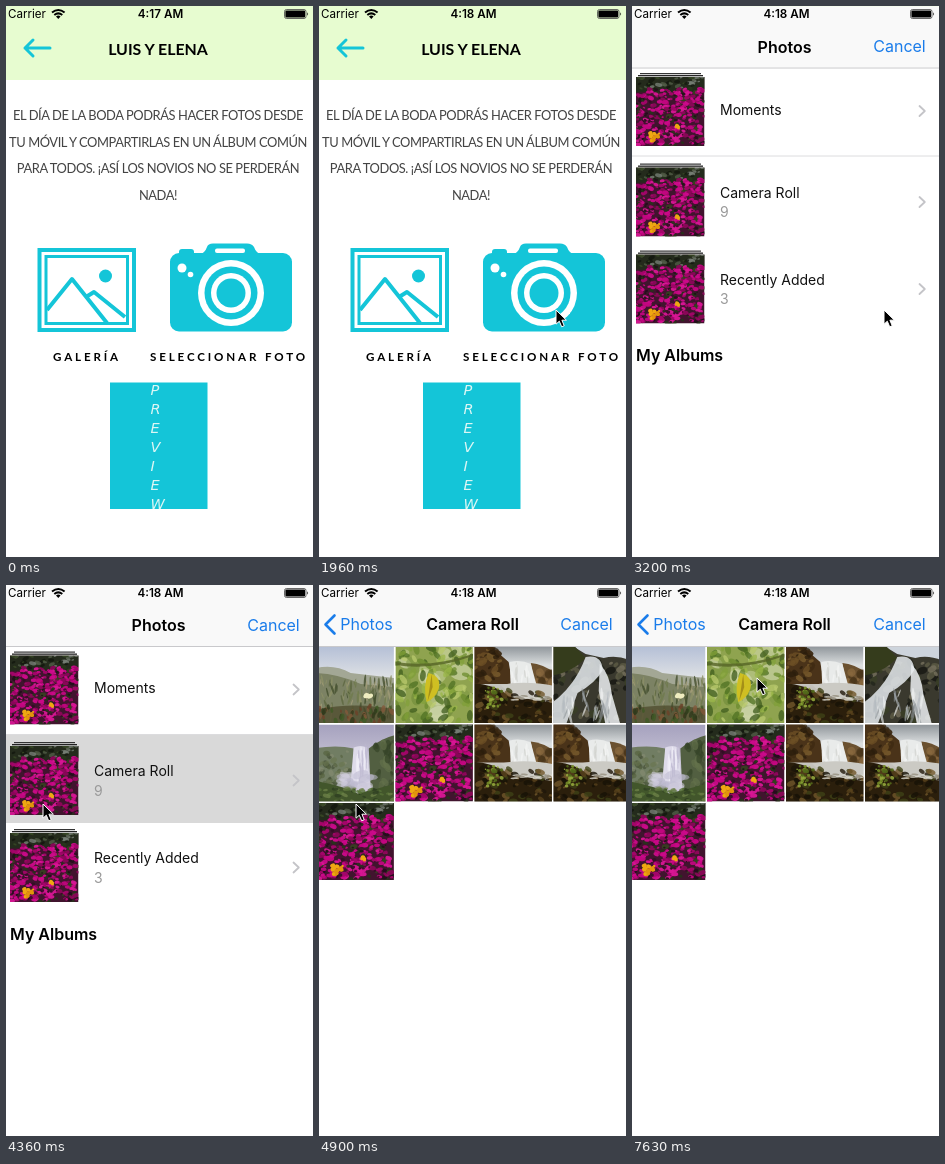
An HTML page that plays this animation: 307 px wide and 551 px high, repeating every 8000 ms.

```html
<!DOCTYPE html>
<html lang="es">
<head>
<meta charset="utf-8">
<title>Álbum de boda</title>
<style>
html, body { margin: 0; width: 100%; height: 100%; overflow: hidden; background: #fff; }
svg { display: block; width: 307px; height: 551px; font-family: Inter, "Noto Sans", sans-serif; }
.hand { font-family: Lato, "Open Sans", sans-serif; }
.body { font-size: 12.9px; letter-spacing: -.42px; fill: #444; text-anchor: middle; }
.label { font-size: 11.6px; font-weight: 700; letter-spacing: 2.85px; }
.row { font-size: 14px; fill: #111; }
.count { font-size: 14px; fill: #999; }
.bold { font-size: 16px; font-weight: 600; }
.nav { font-size: 16px; fill: #1a7cea; text-anchor: middle; }
.mid { text-anchor: middle; }
.line { fill: none; stroke-linecap: round; stroke-linejoin: round; }
</style>
</head>
<body>
<svg id="stage" viewBox="0 0 307 551" xmlns="http://www.w3.org/2000/svg">
  <defs>
    <linearGradient id="shade"><stop offset="0" stop-color="#000" stop-opacity="0"/><stop offset="1" stop-color="#000" stop-opacity=".11"/></linearGradient>
    <linearGradient id="sky" x2="0" y2="1"><stop offset="0" stop-color="#b4bfd6"/><stop offset=".4" stop-color="#dde0e4"/></linearGradient>
    <linearGradient id="dusk" x2="0" y2="1"><stop offset="0" stop-color="#a5a1be"/><stop offset=".5" stop-color="#c9c5d6"/></linearGradient>
    <linearGradient id="mist" x2="0" y2="1"><stop offset="0" stop-color="#8e9499"/><stop offset=".25" stop-color="#dcdfe0"/><stop offset=".6" stop-color="#bdbab2"/></linearGradient>
    <filter id="soft"><feGaussianBlur stdDeviation=".7"/></filter>
    <g id="photos"></g>
  </defs>

  <rect width="307" height="551" fill="#fff"/>
  <g id="page" class="hand">
    <rect width="307" height="74" fill="#e7fcd0"/>
    <path class="line" d="M44 42H19M27 34L19 42L27 50" stroke="#14c5d8" stroke-width="3"/>
    <text class="mid" x="152" y="48.5" font-size="15.9" font-weight="700">LUIS Y ELENA</text>
    <text class="body" x="152" y="113.5">EL DÍA DE LA BODA PODRÁS HACER FOTOS DESDE</text>
    <text class="body" x="152" y="140.5">TU MÓVIL Y COMPARTIRLAS EN UN ÁLBUM COMÚN</text>
    <text class="body" x="152" y="167">PARA TODOS. ¡ASÍ LOS NOVIOS NO SE PERDERÁN</text>
    <text class="body" x="152" y="193.5">NADA!</text>

    <g fill="none" stroke="#14c5d8">
      <rect x="33.5" y="244" width="94.5" height="80" stroke-width="4"/>
      <rect x="40" y="250.5" width="81.5" height="67" stroke-width="3"/>
      <path d="M41 304L66 273L101 317M80 291L88 286L119 311" stroke-width="4" stroke-linejoin="round"/>
    </g>
    <circle cx="99.5" cy="270" r="6.5" fill="#14c5d8"/>

    <g fill="#14c5d8">
      <rect x="164" y="247" width="122" height="78.5" rx="9"/>
      <path d="M193 249Q199 247 201 241Q202 237.5 207 237.5H241Q246 237.5 248 241Q250 247 256 249Z"/>
      <rect x="173" y="243" width="15" height="8" rx="3"/>
      <rect x="209" y="242.5" width="30" height="4.5" rx="2" fill="#fff"/>
      <circle cx="225" cy="287" r="33" fill="#fff"/>
      <circle cx="225" cy="287" r="26.5"/>
      <circle cx="225" cy="287" r="20" fill="#fff"/>
      <circle cx="225" cy="287" r="14.5"/>
      <circle cx="176" cy="262" r="4.5" fill="#fff"/>
      <circle cx="184.5" cy="268.5" r="2.8" fill="#fff"/>
    </g>
    <text class="label" x="47" y="354.5">GALERÍA</text>
    <text class="label" x="144" y="354.5">SELECCIONAR FOTO</text>
    <rect x="104" y="376.5" width="97.5" height="126.5" fill="#14c5d8"/>
    <g id="preview" fill="#dcf6f4" font-family="DejaVu Sans, sans-serif" font-size="14.5" font-style="italic"></g>
  </g>

  <g id="sheet">
    <rect width="307" height="1100" fill="#fff"/>
    <g id="list">
      <rect id="press" y="149.5" width="307" height="88.5" fill="#d9d9d9"/>
      <g id="rows"></g>
      <rect y="149" width="307" height="1" fill="#dcdcde"/>
      <g id="albums">
        <rect y="343" width="307" height="800" fill="#fff"/>
        <text class="bold" x="4" y="354.5">My Albums</text>
      </g>
    </g>
    <rect id="dim" width="307" height="551" fill="#1a1600"/>
    <g id="grid">
      <rect x="-13" width="9" height="551" fill="url(#shade)"/>
      <rect x="-4" width="330" height="551" fill="#fff"/>
      <g id="cells"></g>
    </g>
    <rect width="307" height="61" fill="#f9f9f9"/>
    <rect y="61" width="307" height="1" fill="#c9c9cc"/>
    <path id="back" class="line" d="M15.5 30.5L6.5 39.5L15.5 48.5" stroke="#1a7cea" stroke-width="2.6"/>
    <text id="backText" class="nav" x="47.5" y="45">Photos</text>
    <text id="oldTitle" class="bold mid" y="46">Photos</text>
    <text id="newTitle" class="bold mid" y="45">Camera Roll</text>
    <text id="cancel" class="nav" x="267.5" y="45.5">Cancel</text>
  </g>

  <g id="status">
    <text x="2" y="12.3" font-size="11.6">Carrier</text>
    <path d="M46 6.5Q52.3 1.5 58.6 6.5M48.3 9Q52.3 5.8 56.3 9" fill="none" stroke="#000" stroke-width="2"/>
    <path d="M50 10.5Q52.3 8.7 54.6 10.5L52.3 13Z"/>
    <text id="clock" class="mid" x="154.5" y="12.3" font-size="11.7" font-weight="600"></text>
    <rect x="278.5" y="3.5" width="21.5" height="9" rx="2" fill="none" stroke="#444" stroke-width=".8"/>
    <rect x="279.4" y="4.4" width="19.7" height="7.2" rx="1"/>
    <path d="M301.3 6.3Q303 8 301.3 9.7Z"/>
  </g>

  <path id="cursor" d="M0 0V14.2L3.3 11.2L5.7 16.8L8.2 15.7L5.9 10.2H10.4Z" stroke="#fff" stroke-width="1"/>
</svg>

<script>
const $ = id => document.getElementById(id);
const LOOP = 8000;

let seed = 7;
const rand = (a, b) => {
  seed = (seed * 16807) % 2147483647;
  return a + (b - a) * seed / 2147483647;
};

const path = (fill, d, o = 1) => `<path d="${d}" fill="${fill}" opacity="${o}"/>`;

// Scatter n dabs over the box x0,y0 to x1,y1, tilted by up to `turn` degrees
function dabs(n, fills, [x0, y0, x1, y1], rx, ry, o = 1, turn = 30) {
  let out = '';
  for (let i = 0; i < n; i++) {
    const x = rand(x0, x1).toFixed(1), y = rand(y0, y1).toFixed(1), k = rand(.5, 1.4);
    out += `<ellipse rx="${(rx * k).toFixed(1)}" ry="${(ry * k).toFixed(1)}" fill="${fills[i % fills.length]}" opacity="${o}"`
      + ` transform="translate(${x} ${y}) rotate(${rand(-turn, turn).toFixed(0)})"/>`;
  }
  return out;
}

// name: [base fill, art]
const photos = {
  dunes: ['url(#sky)',
    path('#a3a795', 'M0 22Q18 18 34 27L77 32V50H0Z')
    + path('#7c8264', 'M0 27Q22 28 44 38L77 41V80H0Z')
    + dabs(110, ['#5c6640', '#8c9066', '#434f2e', '#a39c78', '#6f7a4c'], [0, 34, 77, 72], .9, 5, .8, 25)
    + path('#4a4629', 'M-3 64Q40 55 80 64V80H-3Z', .7)
    + dabs(50, ['#6d4128', '#3f5a26', '#82573a', '#2f3a1c'], [0, 60, 77, 78], 1.6, 3, .8)
    + dabs(4, ['#f0edc0'], [49, 48, 54, 51], 2.6, 1.8)],
  leaf: ['#8fa34f',
    dabs(30, ['#c3cf94', '#d5dcb4', '#7f9a43', '#6e8a37'], [0, 0, 77, 77], 8, 6, .6, 90)
    + dabs(110, ['#6b8b2e', '#4d7022', '#9ab548', '#b9c96e', '#82a03a', '#3f5c1d'], [0, 0, 77, 77], 2.4, 4.6, .75, 80)
    + path('#566526', 'M0 16Q36 22 77 8V10Q36 25 0 19Z', .8)
    + path('#cfbf22', 'M33 27Q46 30 43 43Q39 53 31 56Q27 40 33 27Z')
    + path('#a48f18', 'M36 28L32 55L37 41Z')],
  shore: ['url(#mist)',
    path('#4a3319', 'M-3 -3H14Q24 8 34 16L38 38H-3Z')
    + dabs(34, ['#6e5026', '#2b1d0c', '#7d602f', '#3d2a12'], [0, 2, 27, 35], 4, 2.4, .75, 60)
    + path('#6b5130', 'M56 17Q68 18 80 27V44H61Z')
    + dabs(12, ['#8a6a3e', '#493519'], [62, 25, 77, 39], 3, 3, .7, 60)
    + path('#e9ebea', 'M35 16Q46 13 56 18L62 40H36Z')
    + dabs(14, ['#f4f5f4', '#cfd0cc'], [37, 19, 58, 40], 1.2, 6, .7, 8)
    + path('#cbcac4', 'M26 39Q50 34 80 40V57L40 52Z')
    + path('#2b1f0c', 'M-3 37Q20 38 34 50L80 57V80H-3Z')
    + dabs(70, ['#59421d', '#171106', '#71562a', '#3e4117', '#1f170a'], [0, 42, 77, 78], 3.4, 2, .8, 50)
    + dabs(16, ['#dad8d0', '#96907f'], [36, 49, 77, 54], 4, .9, .8, 10)
    + dabs(36, ['#768c28', '#52691b', '#93a63c'], [11, 41, 28, 64], 1.5, 1.3, .9)],
  cascade: ['#3a392e',
    path('#cdd4dc', 'M14 -3H80V16Q64 8 50 12L32 8Z')
    + dabs(80, ['#22241b', '#5d5b45', '#383f25', '#151611', '#75715c'], [0, 14, 77, 77], 4, 2.6, .8, 80)
    + path('#353c1c', 'M-3 -3H18L32 12Q18 27 -3 30Z')
    + path('#dfe3e6', 'M32 11Q48 8 49 24Q42 37 24 47L12 80H-3V58Q21 41 32 11Z', .88)
    + path('#eceff1', 'M46 18Q56 28 58 48L67 80H52L45 45Z', .85)
    + dabs(30, ['#f5f6f7', '#b2b9be', '#8e9498'], [8, 44, 58, 75], 1, 7, .6, 22)],
  falls: ['url(#dusk)',
    path('#717d63', 'M-3 24Q20 20 37 24L38 68H-3Z')
    + path('#525f41', 'M80 10Q64 14 52 24L54 66H80Z')
    + dabs(50, ['#56633f', '#868c72', '#434f36', '#6a7650'], [0, 27, 33, 62], 3, 2.2, .65, 70)
    + dabs(36, ['#3f4d31', '#64714c', '#344227'], [58, 20, 77, 64], 2.4, 4, .65, 40)
    + path('#dedbea', 'M37 23Q44 20 50 23L53 58H34Z')
    + dabs(16, ['#f1eff8', '#bcb7d0'], [38, 25, 50, 58], .9, 7, .7, 5)
    + dabs(22, ['#d3cfe0', '#c0bbd2'], [24, 50, 56, 62], 6, 3, .55)
    + path('#42562b', 'M-3 56Q25 61 41 69L80 59V80H-3Z')
    + dabs(44, ['#587238', '#2e3f22', '#6b8047'], [0, 64, 77, 78], 3, 1.5, .8)],
  flowers: ['#41142e',
    path('#242b1c', 'M-3 -3H80V17H-3Z')
    + dabs(40, ['#515c47', '#12170e', '#777f76', '#384a25'], [0, 0, 77, 13], 3, 1.6, .8)
    + dabs(60, ['#26351a', '#200d19', '#35451f'], [0, 14, 77, 77], 3, 2, .85)
    + dabs(270, ['#c2067f', '#d81695', '#a30569', '#cb0a8a', '#8b0658'], [0, 13, 77, 76], 2.7, 1.7, .95)
    + dabs(60, ['#26331a', '#340c25', '#1c1414'], [0, 18, 77, 78], 1.6, 1.2, .9)
    + dabs(12, ['#efa812', '#e2940c'], [15, 62, 27, 72], 2.6, 2.2)
    + dabs(4, ['#efa812'], [44, 54, 48, 57], 1.9, 1.7)]
};

$('photos').innerHTML = Object.entries(photos).map(([name, [base, art]]) =>
  `<symbol id="${name}" viewBox="0 0 77 77" preserveAspectRatio="none">`
  + `<rect width="77" height="77" fill="${base}"/><g filter="url(#soft)">${art}</g></symbol>`).join('');
const photo = (name, x, y, w, h) => `<use href="#${name}" x="${x}" y="${y}" width="${w}" height="${h}"/>`;

$('preview').innerHTML = [...'PREVIEW'].map((c, i) =>
  `<text x="144.5" y="${388.5 + i * 19}">${c}</text>`).join('');

// name, thumbnail top, text baseline, chevron y, count
$('rows').innerHTML = [
  ['Moments', 66.5, 108, 104.5],
  ['Camera Roll', 157, 191, 195.5, 9],
  ['Recently Added', 244, 278, 282.5, 3]
].map(([name, top, base, mid, n]) =>
  `<rect x="8" y="${top}" width="61" height="1.2" fill="#333"/>`
  + `<rect x="6" y="${top + 2}" width="65" height="1.3" fill="#222"/>`
  + photo('flowers', 4, top + 4, 68.5, 69)
  + `<text class="row" x="88" y="${base}">${name}</text>`
  + (n ? `<text class="count" x="88" y="${base + 19.5}">${n}</text>` : '')
  + `<path class="line" d="M287.5 ${mid - 5}l5.3 5l-5.3 5" stroke="#c4c4c8" stroke-width="1.8"/>`).join('');

$('cells').innerHTML = [
  ['dunes', 'leaf', 'shore', 'cascade'],
  ['falls', 'flowers', 'shore', 'shore'],
  ['flowers']
].map((row, r) => row.map((name, c) =>
  photo(name, -4 + 79 * c, 61 + 78.5 * r, 77.5, 77)).join('')).join('');

// start, end, steps, waypoints
const moves = [
  [170, 880, 10, [[222, 520], [226, 400], [236, 297]]],
  [1040, 1100, 2, [[236, 297], [228, 298]]],
  [1960, 2030, 2, [[228, 298], [237, 304], [252, 304]]],
  [3270, 3350, 2, [[252, 304], [204, 277]]],
  [3430, 4050, 9, [[204, 277], [110, 170], [60, 128], [30, 175], [37, 219]]],
  [5220, 5990, 11, [[37, 219], [100, 165], [180, 138], [217, 156]]],
  [6080, 6770, 10, [[217, 156], [252, 135], [235, 100], [182, 98]]],
  [7000, 7320, 5, [[182, 98], [125, 93]]]
];

function along(pts, p) {
  const s = p * (pts.length - 1), i = Math.min(Math.floor(s), pts.length - 2), f = s - i;
  return pts[i].map((v, k) => v + (pts[i + 1][k] - v) * f);
}

function cursorAt(t) {
  const m = moves.filter(m => t >= m[0]).pop();
  if (!m) return null;
  const [a, b, n, pts] = m;
  const k = Math.floor((t - a) / (b - a) * (n - 1) + 1e-6) + 1;
  return along(pts, Math.min(1, k / n));
}

const clamp = v => Math.max(0, Math.min(1, v));

// cubic-bezier(.25, .1, .25, 1)
function ease(x) {
  if (x <= 0 || x >= 1) return clamp(x);
  const bez = (a, b, u) => 3 * a * u * (1 - u) ** 2 + 3 * b * u * u * (1 - u) + u ** 3;
  let lo = 0, hi = 1;
  for (let i = 0; i < 20; i++) {
    const u = (lo + hi) / 2;
    if (bez(.25, .25, u) < x) lo = u; else hi = u;
  }
  return bez(.1, 1, lo);
}

const hold = (t, from) => from + Math.floor((t - from) / 77) * 77;
const shift = (id, x, y) => $(id).setAttribute('transform', `translate(${x.toFixed(2)} ${y.toFixed(2)})`);
const fade = (id, o) => $(id).setAttribute('opacity', clamp(o).toFixed(3));

function draw(t) {
  const up = ease((hold(t, 2580) - 2640) / 580);
  const push = ease((hold(t, 4510) - 4495) / 440);
  const off = 551 * (1 - up);

  $('clock').textContent = t < 1330 ? '4:17 AM' : '4:18 AM';
  shift('sheet', 0, off);
  shift('albums', 0, -off * 41 / 156);
  fade('press', t < 4280 ? 0 : t < 4360 ? .5 : 1);

  shift('list', -94 * push, -push);
  fade('dim', .1 * push);
  shift('grid', push > 0 ? 307 * (1 - push) : 340, 0);

  shift('oldTitle', 152.5 - 98 * push, -push);
  $('oldTitle').setAttribute('fill', `rgb(${110 * push},${150 * push},${250 * push})`);
  fade('oldTitle', (1 - push) / .35);
  fade('back', push);
  fade('backText', (push - .75) / .2);
  shift('newTitle', 152.5 + 220 * (1 - push), 0);
  fade('newTitle', push);
  shift('cancel', 0, -push);
  fade('cancel', Math.max(.3, Math.abs(2 * push - 1)));

  const c = cursorAt(t);
  fade('cursor', c ? 1 : 0);
  if (c) shift('cursor', c[0], c[1]);
}

const start = performance.now();
function tick() {
  draw((performance.now() - start) % LOOP);
  requestAnimationFrame(tick);
}
tick();
</script>
</body>
</html>
```
